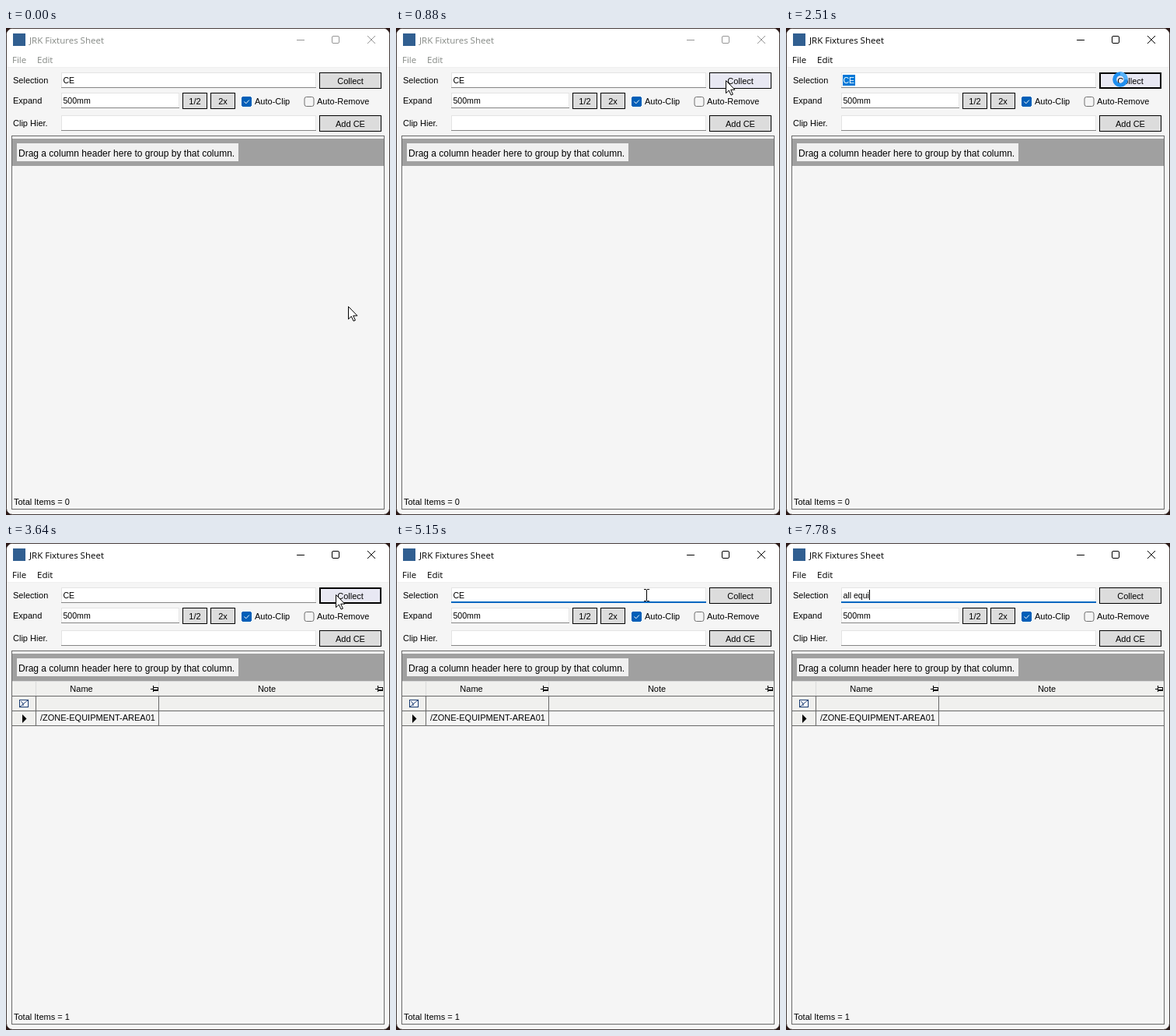
An HTML page that plays this animation: 494x625 px, repeating every 8000 ms.

```html
<!DOCTYPE html>
<html lang="en">
<head>
<meta charset="utf-8">
<title>Table window</title>
<style>
  html, body { margin: 0; width: 100%; height: 100%; overflow: hidden; background: #2b1715; }
  svg { display: block; width: 494px; height: 625px; }
  text { font: 11px "Liberation Sans", Arial, sans-serif; fill: #000; white-space: pre; }
  .ui { font: 11.5px "Open Sans", "Noto Sans", sans-serif; }
  .value { font-size: 10.6px; }
  .mid { text-anchor: middle; }
  .crisp { shape-rendering: crispEdges; }
  .caption { fill: none; stroke: #000; }
  .idle .ui { fill: #858985; }
  .idle .caption { stroke: #969696; }
</style>
</head>
<body>
<svg id="stage" viewBox="0 0 494 625">
  <rect x=".5" y=".5" width="493" height="624" rx="8" fill="#f5f5f5" stroke="#453c3b"/>
  <path d="M1 50V8.500a7.500 7.500 0 0 1 7.500-7.500h477a7.500 7.500 0 0 1 7.500 7.500V50z" fill="#fff"/>
  <path class="crisp" d="M1 50.500H493" stroke="#efefef"/>
  <rect x="9" y="7" width="16" height="16" fill="#315f91"/>

  <g id="chrome">
    <text class="ui" x="30" y="20">JRK Fixtures Sheet</text>
    <text class="ui" x="8" y="45">File</text>
    <text class="ui" x="40" y="45">Edit</text>
    <path class="caption" d="M374 15.500h10M465 10l10 10M475 10l-10 10"/>
    <rect class="caption" x="419.500" y="10.500" width="9" height="9" rx="1.500"/>
  </g>

  <g id="form"></g>

  <rect class="crisp" x="303" y="88" width="13" height="13" rx="3" fill="#005fb8"/>
  <path d="M306.500 94.500l2.300 2.300 4-4.300" fill="none" stroke="#fff"/>
  <text x="320" y="98">Auto-Clip</text>
  <rect id="check" x="384" y="88.500" width="12" height="12" rx="2.500" stroke="#727272"/>
  <text x="400" y="98">Auto-Remove</text>

  <g id="field">
    <rect id="focusLine" class="crisp" x="71" y="75" width="328" height="2" fill="#0067c0"/>
    <rect id="mark" class="crisp" x="73" y="60" width="16" height="14" fill="#0078d7"/>
    <text id="typed" class="value" x="73.400" y="71"></text>
    <rect id="caret" class="crisp" y="60" width="1" height="13"/>
  </g>

  <rect class="crisp" x="7.500" y="138.500" width="479" height="479" fill="#f5f5f5" stroke="#696969"/>
  <rect class="crisp" x="8" y="142" width="478" height="35" fill="#a0a0a0"/>
  <rect class="crisp" x="14" y="148" width="285" height="23" fill="#f0f0f0"/>
  <text x="16" y="165" style="font-size:12px">Drag a column header here to group by that column.</text>

  <g id="grid">
    <g class="crisp">
      <rect x="8" y="177" width="478" height="20" fill="#f0f0ee"/>
      <rect x="8" y="197" width="30" height="37" fill="#f0f0ee"/>
      <rect x="38" y="197" width="448" height="18" fill="#f0f0ee"/>
      <path d="M8 177.500H486M38.500 178V196M196.500 178V196" stroke="#dadada"/>
      <path d="M8 196.500H486M8 215.500H486M8 234.500H486M38.500 196V234M196.500 196V234" stroke="#696969"/>
    </g>
    <text class="mid" x="97" y="191">Name</text>
    <text class="mid" x="335.500" y="191">Note</text>
    <g fill="none" stroke="#000">
      <path id="pin" class="crisp" d="M186 187.500h3M189.500 183v8M190 185.500h5v4h-5M190 188.500h5"/>
      <use href="#pin" x="289"/>
      <rect class="crisp" x="17.500" y="201.500" width="11" height="9" fill="#fff" stroke="#173a70"/>
      <path d="M17 211l12-10M19 203l3 3v3" stroke="#173a70"/>
    </g>
    <path d="M21 220v11l5.500-5.500z"/>
    <text x="44" y="228">/ZONE-EQUIPMENT-AREA01</text>
  </g>
  <text id="total" x="10" y="612"></text>

  <path id="arrow" d="M.5.500v16.200l3.800-3.600 2.800 6 2.300-1-2.700-5.900h5.200z" fill="#fff" stroke="#000"/>
  <g id="beam" class="crisp" fill="none" stroke="#000">
    <path d="M-3 -7.500h3M1 -7.500h3M.5 -7v14M-3 7.500h3M1 7.500h3"/>
  </g>
  <g id="busy" fill="none" stroke-width="5">
    <circle r="7.300" stroke="#1f8ff0"/>
    <path d="M0 -7.300A7.300 7.300 0 0 1 7.300 0" stroke="#58b2f8"/>
  </g>
</svg>
<script>
const LOOP = 8000;
const $ = id => document.getElementById(id);

function add(tag, attrs, text = "") {
  const el = document.createElementNS("http://www.w3.org/2000/svg", tag);
  for (const key in attrs) el.setAttribute(key, attrs[key]);
  el.textContent = text;
  return $("form").appendChild(el);
}

function input(y, width, label, value) {
  add("text", { x: 9, y: y + 14 }, label);
  add("rect", { class: "crisp", x: 71.5, y: y + .5, width: width - 1, height: 19, fill: "#fff", stroke: "#e4e4e4" });
  add("path", { class: "crisp", d: `M71 ${y + 19.5}h${width}`, stroke: "#868686" });
  add("text", { class: "value", x: 73.4, y: y + 14 }, value);
}

function button(x, y, width, label) {
  const box = add("rect", { class: "crisp", x: x + .5, y: y + .5, width: width - 1, height: 20, fill: "#dcdcdc", stroke: "#000" });
  add("text", { class: "mid", x: x + width / 2, y: y + 15 }, label);
  return box;
}

input(57, 328, "Selection", "");
input(83, 152, "Expand", "500mm");
input(112, 328, "Clip Hier.", "");
const collect = button(403, 57, 80, "Collect");
const ring = add("rect", { class: "crisp", x: 404.5, y: 58.5, width: 77, height: 18, fill: "none", stroke: "#000" });
button(227, 83, 32, "1/2");
button(263, 83, 32, "2x");
button(403, 112, 80, "Add CE");

// Each step changes only the listed parts of the state.
const start = {
  active: false, pointer: "arrow", x: 440, y: 357, spin: 0, checkHover: false,
  hover: false, ring: false, marked: false, focus: false, text: "CE", caret: 0, rows: 0
};
const steps = [
  [120, { y: 342 }],
  [250, { x: 441, y: 287 }],
  [380, { x: 440, y: 202 }],
  [500, { x: 437, y: 128 }],
  [630, { x: 433, y: 90, checkHover: true }],
  [750, { x: 427, y: 72, checkHover: false, hover: true }],
  [880, { x: 424, y: 67 }],
  [1250, { active: true, ring: true }],
  [1380, { marked: true, pointer: "busy", x: 430, y: 66, spin: 0 }],
  [1520, { spin: 90 }],
  [1630, { spin: 150 }],
  [1880, { spin: 210 }],
  [2000, { spin: 270 }],
  [2130, { spin: 310 }],
  [2270, { spin: 330 }],
  [2390, { spin: 345 }],
  [2510, { spin: 360 }],
  [2630, { pointer: "arrow", x: 424, y: 67, marked: false, rows: 1 }],
  [3640, { y: 66 }],
  [3770, { x: 408, y: 67 }],
  [3890, { pointer: "beam", x: 370, hover: false }],
  [4020, { x: 334 }],
  [4140, { x: 322 }],
  [4390, { ring: false, focus: true }],
  [4520, { caret: 88 }],
  [5150, { caret: 0 }],
  [5400, { text: "C", caret: 81 }],
  [5520, { text: "", caret: 74 }],
  [6040, { text: "a", caret: 80, pointer: "" }],
  [6160, { caret: 0 }],
  [6290, { text: "al", caret: 82 }],
  [6530, { text: "all", caret: 84 }],
  [6660, { text: "all ", caret: 87 }],
  [7040, { text: "all e", caret: 93 }],
  [7170, { pointer: "beam" }],
  [7420, { text: "all eq", caret: 99, pointer: "" }],
  [7530, { text: "all equ", caret: 105 }],
  [7780, { text: "all equi", caret: 107 }]
];

const show = (el, on) => el.style.display = on ? "" : "none";

function draw(time) {
  const s = Object.assign({}, start, ...steps.filter(([t]) => t <= time).map(([, change]) => change));
  $("chrome").setAttribute("class", s.active ? "" : "idle");
  $("check").setAttribute("fill", s.checkHover ? "#e6e6e6" : "#f5f5f5");
  collect.setAttribute("fill", s.hover ? "#e8e8f3" : "#dcdcdc");
  show(ring, s.ring);
  show($("focusLine"), s.focus);
  show($("mark"), s.marked);
  $("typed").textContent = s.text;
  $("typed").style.fill = s.marked ? "#fff" : "#000";
  show($("caret"), s.caret);
  $("caret").setAttribute("x", s.caret);
  show($("grid"), s.rows);
  $("total").textContent = `Total Items = ${s.rows}`;
  for (const name of ["arrow", "beam", "busy"]) {
    show($(name), s.pointer === name);
    $(name).setAttribute("transform", `translate(${s.x} ${s.y}) rotate(${name === "busy" ? s.spin : 0})`);
  }
}

const begin = performance.now();
function tick() {
  draw((performance.now() - begin) % LOOP);
  requestAnimationFrame(tick);
}
tick();
</script>
</body>
</html>
```
